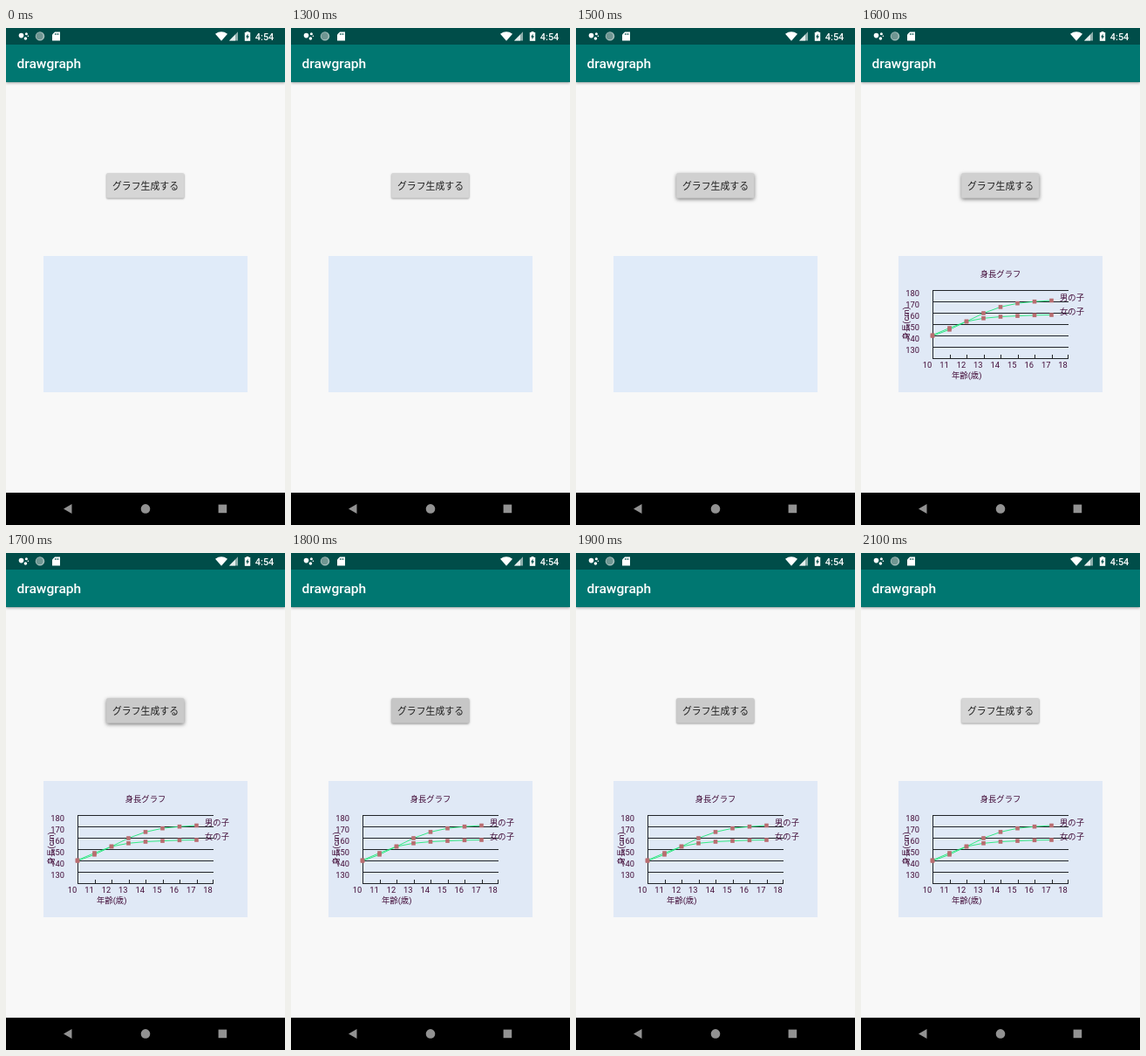
Recreate the animation shown at these times as an HTML page with a canvas. Size 320x569 px, loop 2500 ms.

```html
<!DOCTYPE html>
<html lang="ja">
<head>
<meta charset="utf-8">
<title>drawgraph</title>
<style>
html, body { margin: 0; width: 100%; height: 100%; overflow: hidden; background: #f8f8f8; }
canvas { display: block; width: 320px; height: 569px; }
</style>
</head>
<body>
<canvas id="stage"></canvas>
<script>
const W = 320, H = 569, LOOP = 2500, GRAPH_AT = 1600;
const FONT = 'Roboto, "Noto Sans CJK JP", "Noto Sans CJK", sans-serif';
const canvas = document.getElementById('stage');
const ctx = canvas.getContext('2d');
const dpr = window.devicePixelRatio || 1;
canvas.width = W * dpr;
canvas.height = H * dpr;
ctx.scale(dpr, dpr);

// Button states: start time, grey level, elevation
const press = [
  [0, 214, 0.35], [1500, 208, 1], [1700, 202, 1],
  [1800, 198, 0.5], [1900, 203, 0.35], [2000, 209, 0.35], [2100, 214, 0.35]
];
const boys = [352.5, 345.3, 336, 326.5, 319.4, 315.2, 313.2, 312];
const girls = [351.7, 343.5, 336, 332.3, 330.5, 329.6, 328.8, 328.5];
const ageX = i => 82 + i * 19.5;

function rect(x, y, w, h, fill) {
  ctx.fillStyle = fill;
  ctx.fillRect(x, y, w, h);
}

function disc(x, y, r, fill) {
  ctx.fillStyle = fill;
  ctx.beginPath();
  ctx.arc(x, y, r, 0, Math.PI * 2);
  ctx.fill();
}

function poly(points, fill) {
  ctx.fillStyle = fill;
  ctx.beginPath();
  points.forEach(([x, y]) => ctx.lineTo(x, y));
  ctx.closePath();
  ctx.fill();
}

function text(s, x, y, size, fill, weight = 400, align = 'left') {
  ctx.font = `${weight} ${size}px ${FONT}`;
  ctx.textAlign = align;
  ctx.fillStyle = fill;
  ctx.fillText(s, x, y);
}

function drawStatusBar() {
  rect(0, 0, W, 19, '#004d49');
  disc(17.5, 8.6, 2.8, '#fff');
  disc(23.4, 6.8, 1.5, '#fff');
  disc(22.4, 12, 1.8, '#fff');
  disc(25.4, 9.3, 0.8, '#fff');

  disc(39, 9.4, 5.2, '#a3bdba');
  disc(38.6, 9.2, 3.9, '#6f9692');

  poly([[56, 4.5], [62, 4.5], [62, 14.5], [53, 14.5], [53, 7.5]], '#fff');
  for (let i = 0; i < 3; i++) rect(56 + i * 1.8, 6, 0.8, 2, '#004d49');

  ctx.fillStyle = '#fff';
  ctx.beginPath();
  ctx.moveTo(247, 14.8);
  ctx.lineTo(240, 6.7);
  ctx.quadraticCurveTo(247, 1.8, 254, 6.7);
  ctx.fill();

  poly([[266, 4.3], [266, 14.5], [256, 14.5]], '#8fb0ad');
  poly([[263, 7.4], [263, 14.5], [256, 14.5]], '#e4eeed');

  rect(275.6, 4, 2.8, 2, '#fff');
  rect(273.8, 5, 6.4, 9.8, '#fff');
  poly([[277.6, 6.6], [275, 10.4], [276.6, 10.4], [276.4, 13.2], [279, 9.3], [277.4, 9.3]], '#004d49');
  text('4:54', 285.8, 13.6, 10.9, '#fff', 500);
}

function drawToolbar() {
  ctx.save();
  ctx.shadowColor = 'rgba(0,0,0,.35)';
  ctx.shadowBlur = 3 * dpr;
  ctx.shadowOffsetY = dpr;
  rect(0, 19, W, 43, '#007771');
  ctx.restore();
  text('drawgraph', 12.4, 46.3, 15.56, '#fff', 500);
}

function drawNavBar() {
  rect(0, 532, W, 37, '#000');
  poly([[66, 550.4], [75.5, 545], [75.5, 556]], '#929292');
  disc(160, 550.4, 5.3, '#929292');
  rect(243.6, 545.6, 9.6, 9.6, '#929292');
}

function drawButton(t) {
  const [, grey, lift] = press.filter(s => s[0] <= t).pop();
  ctx.save();
  ctx.shadowColor = `rgba(0,0,0,${0.35 + 0.15 * lift})`;
  ctx.shadowBlur = (1 + 3 * lift) * dpr;
  ctx.shadowOffsetY = (0.3 + 1.2 * lift) * dpr;
  ctx.fillStyle = `rgb(${grey},${grey},${grey})`;
  ctx.beginPath();
  ctx.roundRect(115.2, 166.2, 89.2, 28.6, 1.6);
  ctx.fill();
  ctx.restore();
  text('グラフ生成する', 160, 184.8, 10.9, '#202020', 500, 'center');
}

function drawSeries(ys) {
  ctx.strokeStyle = '#20e878';
  ctx.lineWidth = 0.9;
  ctx.beginPath();
  ys.forEach((y, i) => ctx.lineTo(ageX(i), y));
  ctx.stroke();
  ys.forEach((y, i) => rect(ageX(i) - 2.3, y - 2.3, 4.6, 4.6, '#b96d70'));
}

function drawGraph() {
  const ink = '#420c38', size = 9.34;
  for (let i = 0; i < 7; i++) rect(82, 300 + i * 13, 156, 1, '#202428');
  rect(82, 300, 1, 78, '#202428');
  for (let i = 1; i < 9; i++) rect(Math.round(ageX(i)) - (i === 8 ? 1 : 0), 374, 1, 4, '#202428');

  drawSeries(boys);
  drawSeries(girls);

  text('身長グラフ', 160, 284.7, size, ink, 400, 'center');
  for (let i = 0; i < 6; i++) text(180 - i * 10, 67, 306.5 + i * 13, size, ink, 400, 'right');
  for (let i = 0; i < 9; i++) text(10 + i, 76 + i * 19.45, 388.7, size, ink, 400, 'center');
  text('年齢(歳)', 104, 401.4, size, ink);
  text('男の子', 228, 312, size, ink);
  text('女の子', 228, 328.3, size, ink);

  ctx.save();
  ctx.translate(54.8, 357.3);
  ctx.rotate(-Math.PI / 2);
  text('身長(cm)', 0, 0, size, ink);
  ctx.restore();
}

function draw(t) {
  const shown = t >= GRAPH_AT;
  rect(0, 0, W, H, '#f8f8f8');
  drawToolbar();
  drawStatusBar();
  drawButton(t);
  rect(43, 261, 234, 156, shown ? '#e0e9f6' : '#e0ebf9');
  if (shown) drawGraph();
  drawNavBar();
}

const start = performance.now();
function tick() {
  draw((performance.now() - start) % LOOP);
  requestAnimationFrame(tick);
}
tick();
</script>
</body>
</html>
```
